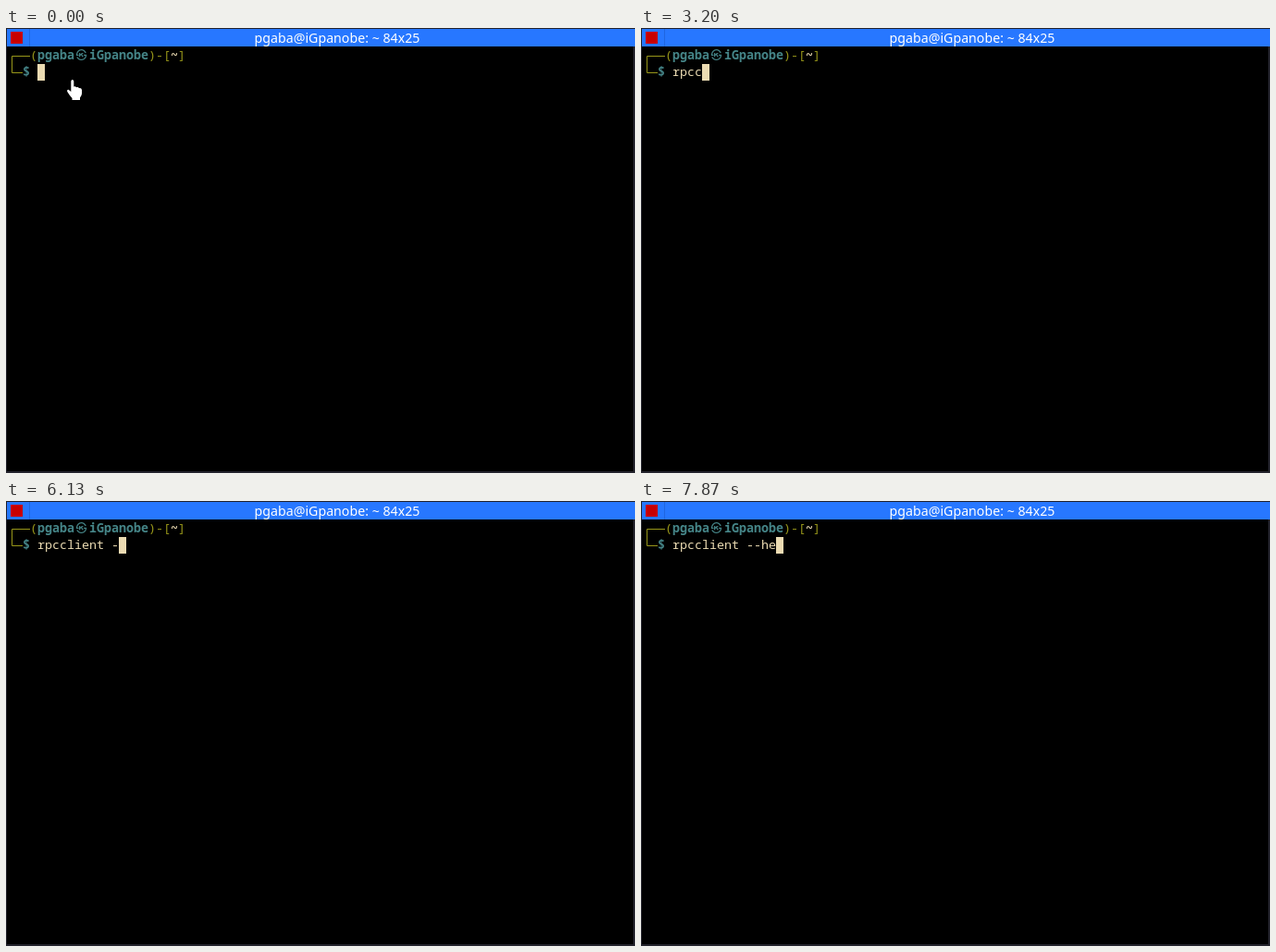
Write an HTML page that moves like this. It is 680 px wide and 482 px high and loops after 8000 ms.

```html
<!DOCTYPE html>
<html lang="en">
<head>
<meta charset="utf-8">
<title>Terminal</title>
<style>
  html, body { margin: 0; width: 100%; height: 100%; overflow: hidden; background: #000; }
  svg { display: block; width: 680px; height: 482px; }
  .term { font: 13.333px "Noto Sans Mono", monospace; white-space: pre; font-variant-ligatures: none; }
  .title { font: 14.2px "Noto Sans", sans-serif; fill: #fff; text-anchor: middle; }
  .green { fill: #98971a; }
  .blue { fill: #458588; font-weight: bold; }
  .text, .block { fill: #ebdbb2; }
  .bold { font-weight: bold; }
  .badge { font: bold 12px "Noto Sans CJK KR", "Noto Sans CJK", "Noto Sans CJK JP", sans-serif; text-anchor: middle; }

  .caret, .block, .hand, .beam { animation: 8s step-end infinite; }
  .caret { animation-name: type; }
  .block { animation-name: blink; }
  .hand { animation-name: hand; }
  .beam { animation-name: beam; }

  /* one character cell is 8px wide */
  @keyframes type {
    0% { transform: translateX(0); }
    30% { transform: translateX(8px); }
    34.125% { transform: translateX(16px); }
    36.625% { transform: translateX(24px); }
    40% { transform: translateX(32px); }
    53.375% { transform: translateX(40px); }
    55% { transform: translateX(48px); }
    57.5% { transform: translateX(80px); }
    76.625% { transform: translateX(88px); }
    78.375% { transform: translateX(96px); }
    81.625% { transform: translateX(104px); }
    85.875% { transform: translateX(112px); }
    89.125% { transform: translateX(120px); }
    98.375%, 100% { transform: translateX(112px); }
  }
  @keyframes blink {
    0%, 53.375%, 72.5%, 97.5%, 100% { opacity: 1; }
    46.625%, 65%, 96.625% { opacity: 0; }
  }
  @keyframes hand {
    0% { transform: none; opacity: 1; }
    1.625% { transform: translate(-1px, -1px); opacity: 1; }
    3.375%, 100% { transform: none; opacity: 0; }
  }
  @keyframes beam {
    0%, 29.125%, 100% { transform: none; opacity: 0; }
    3.375% { transform: translate(2px, 2px); opacity: 1; }
    4.125% { transform: none; opacity: 1; }
  }
</style>
</head>
<body>
<svg viewBox="0 0 680 482">
  <!-- window -->
  <rect width="680" height="482" fill="#22222b"/>
  <rect x="1" y="1" width="677" height="479"/>
  <rect x="1" y="1" width="679" height="19" fill="#2777ff"/>
  <rect x="25" y="1" width="1" height="19" fill="#1f66e0"/>
  <rect x="5" y="4" width="13" height="13" fill="#c80000"/>
  <text class="title" x="358" y="16">pgaba@iGpanobe: ~ 84x25</text>

  <!-- prompt -->
  <path d="M26 30.5H6.5V48.5H18" fill="none" stroke="#98971a"/>
  <g class="term">
    <text y="34"><tspan class="green" x="26">(</tspan><tspan class="blue" x="34">pgaba</tspan><tspan class="blue" x="90">iGpanobe</tspan><tspan class="green" x="154">)-[</tspan><tspan class="text bold" x="178">~</tspan><tspan class="green" x="186">]</tspan></text>
    <text class="blue badge" x="81.5" y="33.6">㉿</text>
    <text class="blue" x="18" y="52">$</text>
    <text class="text" x="34" y="52">rpcclient --hep</text>
  </g>

  <!-- the caret carries a mask over the text not typed yet -->
  <g class="caret">
    <rect x="34" y="39" width="140" height="18"/>
    <rect class="block" x="34" y="39" width="8" height="18"/>
  </g>

  <!-- mouse pointers -->
  <path class="hand" fill="#fff" d="M70.3 57.5Q71.8 54.6 73.3 57.5V63.5Q75 62.5 76 64.3Q78 63.5 79 65.2Q81.5 64.7 82 67V71Q82 73 80 75.5V78H71.5V76Q69 73.5 66.3 69Q65.6 66.8 67.6 66.8L70.3 69Z"/>
  <path class="beam" fill="none" stroke="#fff" d="M63 43.5h4M64.5 44v12M63 56.5h4"/>
</svg>
</body>
</html>
```
